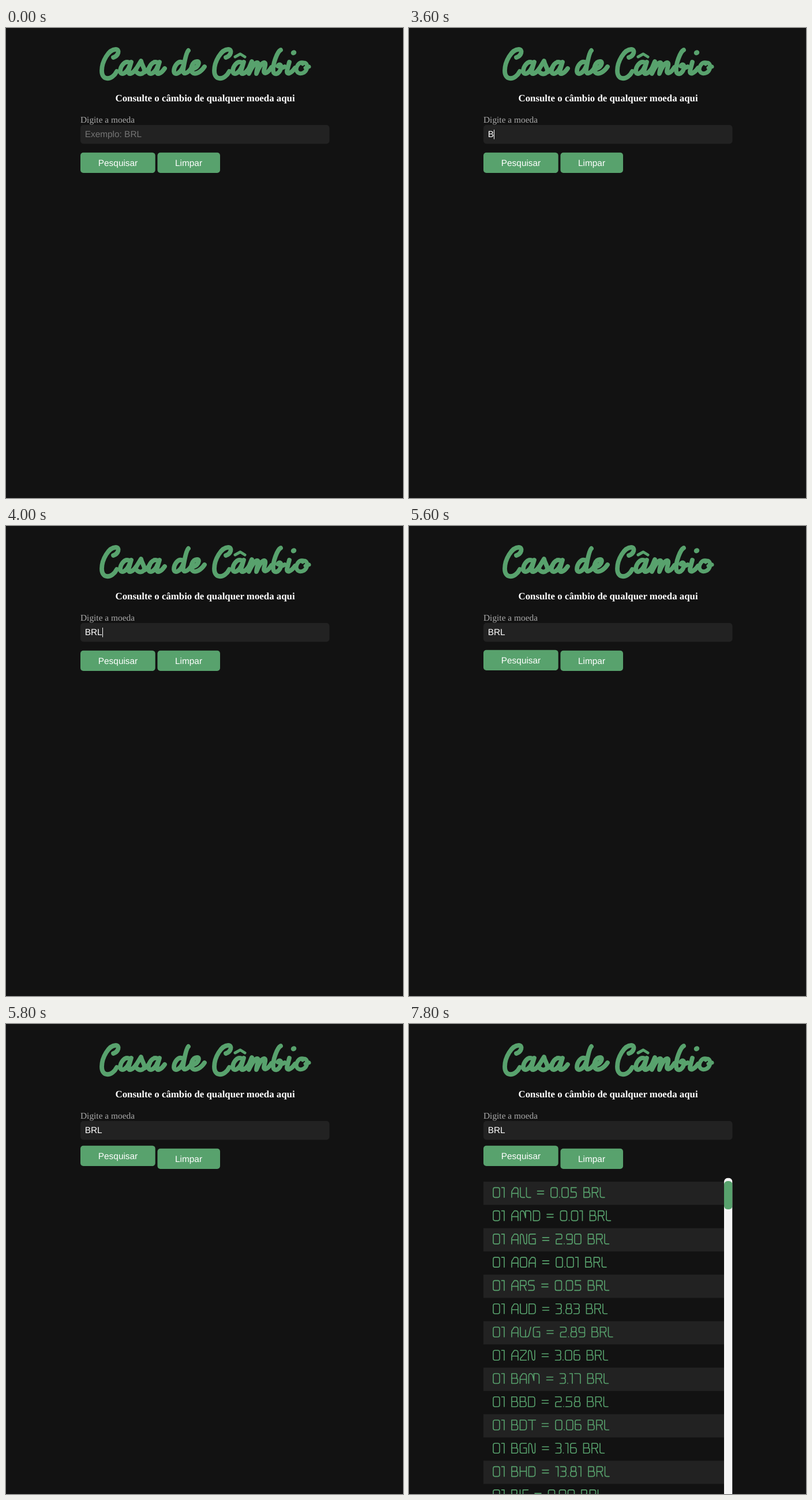
Animation, 688 px wide and 814 px high, one loop 8 s. Source, as an HTML page:

```html
<!DOCTYPE html>
<html lang="pt-BR">
<head>
<meta charset="utf-8">
<title>Casa de Câmbio</title>
<style>
html, body { margin: 0; width: 100%; height: 100%; overflow: hidden; background: #121212; }
#stage { display: block; width: 688px; height: 814px; text-rendering: geometricPrecision; }
.green { fill: #58a26d; }
.pen { fill: none; stroke: #58a26d; stroke-linecap: round; stroke-linejoin: round; }
.sans { font: 15.4px "Liberation Sans", Arial, sans-serif; fill: #fff; }
.serif { font: 15.4px "Liberation Serif", Times, serif; fill: #aaa; }
#heading { font-size: 16.84px; font-weight: bold; fill: #fff; }
</style>
</head>
<body>
<svg id="stage" viewBox="0 0 688 814">
  <defs>
    <path id="bigC" d="M186 51C195 48 198 37 190 37C178 37 166 58 166 74C166 92 184 91 192 75"/>
    <path id="smallA" d="M214 60C206 55 198 67 198 75C199 83 209 79 214 66M217 59L212.500 74C211 83 220 79 226 70"/>
  </defs>
  <g class="pen" stroke-width="7.8" role="img" aria-label="Casa de Câmbio">
    <use href="#bigC"/>
    <use href="#smallA"/>
    <path d="M223 75L234 57C236 66 242 72 239 76C236 81 230 80 227 77M239 77Q244 75 249 68"/>
    <use href="#smallA" x="49"/>
    <path d="M307 60C298 55 291 67 291 75C292 83 302 79 307 66M316 39C312 43 309 60 307 72C306 82 314 79 320 71"/>
    <path d="M322 71C332 70 338 58 331 58C323 58 318 72 323 77C328 82 338 76 344 67"/>
    <use href="#bigC" x="195"/>
    <use href="#smallA" x="195"/>
    <path d="M397 50L406 45L414 50" stroke-width="5"/>
    <path d="M421 70L426 58L421 79C426 68 432 59 436 60C439 62 434 72 434 79C438 68 444 59 448 60C452 62 446 72 447 76C449 81 455 76 460 68"/>
    <path d="M476 38C470 41 462 63 463 74C464 83 473 80 476 71C478 64 474 61 471 66M476 70L483 67"/>
    <path d="M491 59L487 74C486 82 494 79 501 69"/>
    <path d="M498 43l1-.5" stroke-width="8.500"/>
    <path d="M515 60C507 58 501 69 504 75C508 82 520 79 522 68C522 61 517 58 514 62M519 69L525 67" stroke-width="7"/>
  </g>
  <text id="heading" class="serif" x="189.500" y="127">Consulte o câmbio de qualquer moeda aqui</text>
  <text class="serif" x="129" y="164">Digite a moeda</text>
  <rect x="129" y="168" width="431.500" height="32.500" rx="5" fill="#222"/>
  <text id="field" class="sans" x="136.700" y="189"></text>
  <path id="squiggle" d="M137 191.500l1.500-1.500l1.500 1.500l1.500-1.500l1.500 1.500l1.500-1.500l1.500 1.500l1.500-1.500l1.500 1.500l1.500-1.500l1.500 1.500l1.500-1.500l1.500 1.500l1.500-1.500l1.500 1.500l1.500-1.500l1.500 1.500l1.500-1.500l1.500 1.500l1.500-1.500l1.500 1.500" fill="none" stroke="#d22"/>
  <rect id="caret" y="176" width="1" height="16.500" fill="#fff"/>
  <g id="search">
    <rect class="green" x="129" y="215.800" width="129.700" height="35.200" rx="5"/>
    <text class="sans" x="159.800" y="239">Pesquisar</text>
  </g>
  <rect class="green" x="262.500" y="215.800" width="108.500" height="35.200" rx="5"/>
  <text class="sans" x="293" y="239">Limpar</text>
  <svg id="results" x="129" y="266.500" width="431.500" height="548">
    <g id="rows"></g>
    <rect x="417" width="14.500" height="600" rx="7" fill="#f5f5f5"/>
    <rect id="thumb" class="green" x="417" width="14.500" height="49" rx="6"/>
  </svg>
</svg>
<script>
const LOOP = 8000, ROW = 40.27;
const $ = id => document.getElementById(id);

// Thin stroke font: [advance, path], cap height 17.
const ring = 'M5 0H10Q13 0 13 3V14Q13 17 10 17H5Q2 17 2 14V3Q2 0 5 0';
const glyphs = {
  ' ': [8.5, ''],
  '=': [15, 'M2 6H13M2 11H13'],
  '.': [4, 'M2 16.5V17'],
  0: [15, ring],
  1: [8.5, 'M1.5 0H6V17'],
  2: [14, 'M1.500 0H9Q12 0 12 3V5.500Q12 8.500 9 8.500H5Q2 8.500 2 11.500V17H12'],
  3: [13, 'M1.500 0H8Q11 0 11 3V5Q11 8 8 8H4M8 8Q11 8 11 11V14Q11 17 8 17H1.500'],
  4: [13.5, 'M4 0L2 9V11H12M8 6V17'],
  5: [14.5, 'M12 0H3V7.500H9Q12 7.500 12 10.500V14Q12 17 9 17H1.500'],
  6: [14, 'M11 0H5Q2 0 2 3V14Q2 17 5 17H9Q12 17 12 14V10.500Q12 7.500 9 7.500H2'],
  7: [13.5, 'M1.500 0H9Q11.500 0 11.500 3V17'],
  8: [14, 'M5 0H9Q11 0 11 2V5Q11 8 9 8H5Q3 8 3 5V2Q3 0 5 0M5 8H9Q12 8 12 11V14Q12 17 9 17H5Q2 17 2 14V11Q2 8 5 8'],
  9: [14, 'M3 17H9Q12 17 12 14V3Q12 0 9 0H5Q2 0 2 3V6.500Q2 9.500 5 9.500H12'],
  A: [15, 'M2 17V8Q2 6 4 3.500L6.500 0H9Q13 0 13 4V17M2 10H13'],
  B: [14.5, 'M2 0H9Q11 0 11 2V5Q11 8 9 8H2M9 8Q12.500 8 12.500 11V14Q12.500 17 9 17H2V0'],
  D: [15, 'M2 0H9Q13 0 13 4V13Q13 17 9 17H2Z'],
  E: [13, 'M11.500 0H2V17H11.500M2 8H10'],
  F: [12, 'M11 0H2V17M2 8H9.500'],
  G: [15, 'M13 0H5Q2 0 2 3V14Q2 17 5 17H13V8H8'],
  H: [15, 'M2 0V17M13 0V17M2 8H13'],
  I: [5, 'M2 0V17'],
  L: [10.5, 'M2 0V14Q2 17 5 17H9.500'],
  M: [22.5, 'M2 17V4Q2 0 5 0T9 4L11 12V0H16Q20 0 20 4V17'],
  N: [15, 'M2 17V3Q2 0 4 0T7 3L8.500 14Q9 17 11 17T13 14V0'],
  O: [15, ring],
  R: [14, 'M2 17V0H9Q12 0 12 3V5.500Q12 8.500 9 8.500H2M8 8.500L12 17'],
  S: [14.5, 'M12 0H5Q2 0 2 3V5Q2 8 5 8H9Q12 8 12 11V14Q12 17 9 17H2'],
  T: [14.5, 'M1 0H14M8 0V17'],
  U: [15, 'M2 0V14Q2 17 5 17H10Q13 17 13 14V0'],
  W: [22.5, 'M2 0V13Q2 17 6 17H11V5M11 17H13Q16 17 17 13L20 0'],
  Z: [14, 'M2 0H12V3L2 14V17H12.5']
};

function write(text, x, y) {
  return [...text].map(char => {
    const [advance, d] = glyphs[char];
    const path = d && `<path d="${d}" transform="translate(${x} ${y})"/>`;
    x += advance;
    return path;
  }).join('');
}

const rates = `AED 1.42,AFN 0.07,ALL 0.05,AMD 0.01,ANG 2.90,AOA 0.01,ARS 0.05,AUD 3.83,
AWG 2.89,AZN 3.06,BAM 3.17,BBD 2.58,BDT 0.06,BGN 3.16,BHD 13.81,BIF 0.00`.split(/,\s*/);

$('rows').innerHTML = rates.map((rate, i) => {
  const label = `01 ${rate.replace(' ', ' = ')} BRL`, y = i * ROW;
  const stripe = i % 2 ? '' : `<rect y="${y}" width="417" height="${ROW}" fill="#222"/>`;
  return `${stripe}<g class="pen" stroke-width="1.6" role="img" aria-label="${label}">${write(label, 15, y + 10.3)}</g>`;
}).join('');

const show = (id, on) => $(id).setAttribute('visibility', on ? 'visible' : 'hidden');
const shift = (id, y) => $(id).setAttribute('transform', `translate(0 ${y})`);

function draw(t) {
  const typed = t < 3600 ? 0 : t < 3800 ? 1 : t < 4000 ? 2 : 3;
  $('field').textContent = typed ? 'BRL'.slice(0, typed) : 'Exemplo: BRL';
  $('field').style.fill = typed ? '#fff' : '#757575';
  $('caret').setAttribute('x', [137, 147, 158, 167][typed]);
  show('caret', t >= 1200 && t < 5600);
  show('squiggle', t >= 5000 && t < 5600);
  shift('search', t < 5600 ? 0 : t < 5800 ? -1 : -5);
  show('results', t >= 6400);
  const scrolled = t >= 7800;
  shift('rows', scrolled ? -74 : 0);
  shift('thumb', scrolled ? 5.5 : 0);
}

function tick() {
  draw(performance.now() % LOOP);
  requestAnimationFrame(tick);
}
tick();
</script>
</body>
</html>
```
